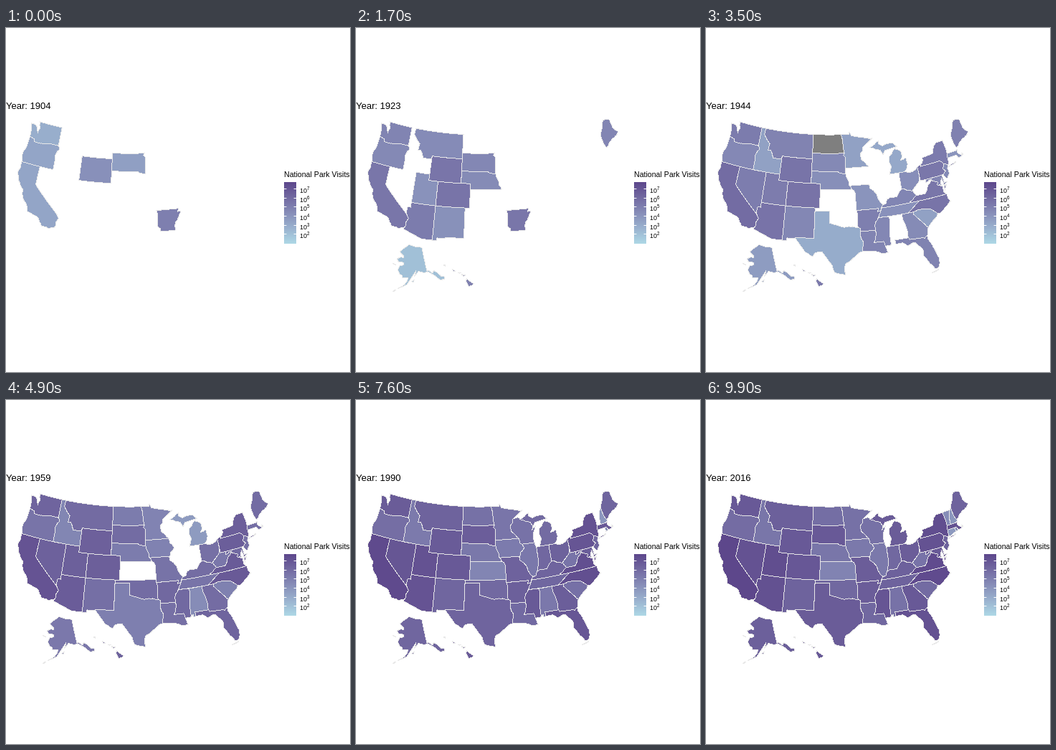
An HTML page that plays this animation: 480x480 px, repeating every 10 s.

```html
<!DOCTYPE html>
<html lang="en">
<head>
<meta charset="utf-8">
<title>Park visits by state</title>
<style>
html, body { margin: 0; width: 100%; height: 100%; overflow: hidden; background: #fff; }
svg { display: block; width: 480px; height: 480px; }
text { font-family: "Liberation Sans", Arial, sans-serif; fill: #000; }
#map path { stroke: #e8e8e8; stroke-width: 1; stroke-linejoin: round; shape-rendering: crispEdges; }
</style>
</head>
<body>
<svg viewBox="0 0 480 480">
  <g id="map"></g>
  <text id="year" x="0" y="113" font-size="13"></text>
  <g id="legend"><text x="388" y="208" font-size="10.6">National Park Visits</text></g>
</svg>
<script>
const LOOP = 10000, STEPS = 100, FIRST = 1904, LAST = 2016;
const NO_DATA = { ND: [1943, 1948] };

// Winding borders shared by two states, as key points in degrees west,north
const BORDERS = {
  'WA-OR': '124.05,46.25 122.9,46.1 122.75,45.65 121.2,45.65 119.3,45.93 118.98,46',
  'OR-ID': '116.92,46 116.5,45.5 117.2,44.4 117.03,43.8',
  'ID-MT': '111.05,44.5 113,44.45 113.9,45.65 114.5,45.6 114.35,46.65 116.05,48',
  'NV-AZ': '114.04,36.2 114.74,36.1 114.63,35',
  'CA-AZ': '114.63,35 114.14,34.3 114.53,33.5 114.5,33 114.72,32.72',
  'ND-MN': '97.23,49 96.85,47.5 96.56,45.94',
  'SD-MN': '96.56,45.94 96.85,45.6 96.45,45.3 96.45,43.5',
  'SD-NE': '96.45,42.5 97.9,42.8 98.5,43',
  'NE-IA': '96.45,42.5 95.85,41.2 95.77,40.58',
  'KS-MO': '95.3,40 94.9,39.8 94.6,39.1',
  'OK-TX': '100,34.56 97.2,33.8 95.5,33.9 94.48,33.64',
  'TX-LA': '94.04,32 93.55,31.2 93.85,29.7',
  'MN-WI': '92.1,46.75 92.3,46.1 92.85,45.6 92.75,44.75 91.2,43.5',
  'IA-WI': '91.2,43.5 91.1,42.7 90.65,42.5',
  'IA-IL': '90.65,42.5 90.2,41.8 91.1,41.2 91.4,40.4',
  'MO-IL': '91.4,40.4 91.4,39.9 90.15,38.8 89.6,37.4 89.1,37',
  'AR-MS': '90.3,35 91.1,33.9 91.17,33',
  'LA-MS': '91.17,33 91,32.4 91.6,31',
  'MS-AL': '88.1,34.95 88.45,31.9 88.4,30.3',
  'IL-IN': '87.53,39.35 88.1,37.8',
  'IL-KY': '88.1,37.8 88.5,37.1 89.1,37',
  'IN-KY': '84.8,39.1 85.4,38.7 86,38 88.1,37.8',
  'OH-KY': '84.8,39.1 83.7,38.65 82.6,38.4',
  'OH-WV': '80.52,40.64 80.85,39.7 81.7,39.1 82.6,38.4',
  'MI-WI': '87.6,45.1 88.1,45.9 90.4,46.55',
  'WV-VA': '81.97,37.54 80.3,37.5 79.2,38.7 78.35,39.4 77.83,39.13',
  'VA-MD': '77.83,39.13 77.05,38.8 77.3,38.4',
  'TN-NC': '81.68,36.59 84.32,35',
  'NC-SC': '83.1,35 82.3,35.2 81.05,35.15 79.7,34.8 78.55,33.86',
  'GA-SC': '83.1,35 83.35,34.7 81.4,32.6 80.9,32.05',
  'GA-AL': '85.6,35 85.15,32.85 85,31',
  'GA-FL': '85,31 84.86,30.7 82.2,30.57 82.05,30.36 81.45,30.7',
  'PA-NJ': '74.7,41.36 75.2,40.65 74.75,40.2 75.4,39.8',
  'PA-NY': '79.76,42 75.35,42 74.7,41.36',
  'NY-VT': '73.35,45 73.25,43.6 73.28,42.75',
  'VT-NH': '71.5,45 72.05,44.1 72.46,42.73',
  'NH-ME': '71.1,45.3 70.98,43.4 70.7,43.08'
};

// id: [year,shade keys, outlines]; ~ walks a shared border backwards
const STATES = {
  WA: ['1904,28 2016,87', '124.7,48.4 123.1,48.1 122.5,47.2 122.3,48 122.76,49 117.03,49 116.92,46 ~WA-OR 124.1,46.9'],
  OR: ['1904,34 2016,73', 'WA-OR OR-ID 117.03,42 124.2,42 124.5,42.85 124.1,44.5'],
  CA: ['1904,34 2016,100', '124.2,42 120,42 120,39 CA-AZ 117.12,32.53 118,33.65 118.5,34.03 119.2,34.15 120.6,34.5 120.65,35.15 121.9,36.3 122.5,37.8 123.7,38.9 124.35,40.3 124.1,41'],
  NV: ['1933,20 1944,73 2016,92', '120,42 114.04,42 NV-AZ 120,39'],
  ID: ['1925,28 2016,66', '117.03,49 116.05,49 ~ID-MT 111.05,42 117.03,42 ~OR-ID'],
  MT: ['1911,35 2016,82', '116.05,49 104.05,49 104.05,45 111.05,45 ID-MT'],
  WY: ['1904,48 2016,87', '111.05,45 104.05,45 104.05,41 111.05,41'],
  UT: ['1917,35 2016,95', '114.04,42 111.05,42 111.05,41 109.05,41 109.05,37 114.04,37'],
  CO: ['1909,55 2016,88', '109.05,41 102.05,41 102.05,37 109.05,37'],
  AZ: ['1915,52 2016,93', '114.04,37 109.05,37 109.05,31.33 111.07,31.33 114.81,32.5 ~CA-AZ ~NV-AZ'],
  NM: ['1916,38 2016,80', '109.05,37 103,37 103.05,32 106.6,32 106.53,31.78 108.2,31.78 108.2,31.33 109.05,31.33'],
  ND: ['1948,57 2016,72', '104.05,49 ND-MN 104.05,45.94'],
  SD: ['1904,38 1944,63 2016,87', '104.05,45.94 SD-MN SD-NE 104.05,43'],
  NE: ['1920,50 2016,66', '104.05,43 ~SD-NE NE-IA 95.3,40 102.05,40 102.05,41 104.05,41'],
  KS: ['1966,52 2016,57', '102.05,40 KS-MO 94.62,37 102.05,37'],
  OK: ['1950,72 2016,76', '103,37 94.62,37 94.43,35.4 ~OK-TX 100,36.5 103,36.5'],
  TX: ['1944,40 2016,85', '103,36.5 100,36.5 OK-TX 94.04,33.55 TX-LA 95.2,29 97.1,27.8 97.3,27 97.2,25.95 99.1,26.4 99.5,27.5 101.4,29.77 102.7,29.7 103.15,28.98 104.6,29.7 106.53,31.78 106.6,32 103.05,32'],
  MN: ['1939,42 2016,70', '97.23,49 95.15,49 95.15,49.38 94.6,48.7 92,48.3 89.6,48 MN-WI 96.45,43.5 ~SD-MN ~ND-MN'],
  IA: ['1950,55 2016,64', '96.45,43.5 91.2,43.5 IA-WI IA-IL 91.7,40.6 ~NE-IA'],
  MO: ['1943,55 2016,84', '95.77,40.58 91.7,40.6 MO-IL 89.5,36.5 89.7,36 90.37,36 90.1,36.5 94.62,36.5 ~KS-MO'],
  AR: ['1904,60 1944,70 2016,84', '94.62,36.5 90.1,36.5 90.37,36 89.7,36 AR-MS 94.04,33 94.04,33.55 94.48,33.64 94.43,35.4'],
  LA: ['1934,62 2016,76', '94.04,33 LA-MS 89.73,31 89.5,30.2 89.4,29.8 89.1,29.05 90.2,29.1 91.8,29.6 ~TX-LA'],
  MS: ['1933,52 2016,90', '90.3,35 MS-AL 89.5,30.2 89.73,31 ~LA-MS ~AR-MS'],
  AL: ['1956,48 2016,69', '88.1,34.95 GA-AL 87.6,31 87.5,30.3 88,30.25 88,30.7 ~MS-AL'],
  TN: ['1931,44 2016,80', '89.5,36.5 83.68,36.6 TN-NC 90.3,35 89.7,36'],
  KY: ['1933,59 2016,81', '~IL-KY ~IN-KY OH-KY 81.97,37.54 83.68,36.6 89.5,36.5'],
  IL: ['1972,66 2016,64', '90.65,42.5 87.8,42.5 87.53,41.7 IL-IN IL-KY ~MO-IL ~IA-IL'],
  IN: ['1967,78 2016,76', '87.53,41.7 86.8,41.76 84.8,41.75 IN-KY ~IL-IN'],
  OH: ['1934,49 2016,84', '84.8,41.72 83.45,41.72 82.7,41.45 81.7,41.5 80.52,42 OH-WV ~OH-KY'],
  MI: ['1940,42 1959,40 2016,85', '86.8,41.76 83.45,41.73 82.5,42.8 82.6,43.9 83.9,43.7 83.3,44.3 83.4,45.1 84.75,45.75 85.6,45 86.25,44.6 86.5,43.9 86.2,42.8',
    '88.2,47.45 88.3,46.9 87.4,46.5 85,46.75 84,46 87,45.75 MI-WI'],
  WI: ['1972,68 2016,70', '92.1,46.75 90.9,46.95 ~MI-WI 88,44.55 87,45.2 87.5,44.4 87.9,43.2 87.8,42.5 ~IA-WI ~MN-WI'],
  GA: ['1933,50 2016,87', 'GA-SC ~GA-FL ~GA-AL'],
  FL: ['1934,57 2016,92', '87.6,31 GA-FL 81.2,29.7 80.55,28.4 80.05,26.9 80.15,25.75 80.4,25.2 81.1,25.15 81.8,26.1 82.7,27.6 82.65,28.7 84,30.1 85.3,29.7 86.2,30.35 87.5,30.3',
    '80.4,25 81.7,24.6 81,24.7'],
  SC: ['1938,40 2016,74', 'NC-SC 79.2,33.2 ~GA-SC'],
  NC: ['1931,66 2016,97', '~TN-NC 75.87,36.55 75.5,35.25 76.5,34.65 77.95,33.87 ~NC-SC'],
  VA: ['1930,63 2016,97', '83.68,36.6 WV-VA VA-MD 76.3,37.9 76.3,37 75.87,36.55', '75.4,38 75.9,37.95 76,37.2'],
  WV: ['1955,65 2016,68', '~OH-WV 80.52,39.72 79.48,39.72 79.48,39.2 78.4,39.6 ~WV-VA'],
  MD: ['1933,56 2016,86', '79.48,39.72 75.79,39.72 75.7,38.46 75.05,38.45 75.9,37.95 76.1,39.3 76.5,38.5 76.35,38.1 ~VA-MD 78.4,39.6 79.48,39.2'],
  PA: ['1933,68 2016,92', '80.52,42 79.76,42.27 PA-NY PA-NJ 75.79,39.72 80.52,39.72'],
  NJ: ['1933,54 2016,80', '74.7,41.36 73.9,41 74.2,40.45 74.1,39.75 74.9,38.95 75.5,39.5 ~PA-NJ'],
  NY: ['1933,62 2016,95', '79.76,42.27 78.9,42.9 79.05,43.27 76.3,43.5 76.2,44.1 75,44.98 NY-VT 73.5,42.05 73.6,41.1 73.9,41 ~PA-NY', '74,40.6 73.2,40.9 72,41.05 72.6,40.8'],
  VT: ['1998,50 2016,50', 'VT-NH ~NY-VT'],
  NH: ['1967,43 2016,44', 'NH-ME 70.85,42.87 71.3,42.7 ~VT-NH'],
  ME: ['1919,52 2016,80', '71.1,45.3 70,46.7 69.23,47.45 68.3,47.36 67.8,47.07 67.8,45.7 67,44.8 69,44.1 ~NH-ME'],
  MA: ['1938,46 2016,92', '73.28,42.75 71.3,42.7 70.85,42.87 71,42.3 70.5,41.8 70,41.8 70.15,42.05 69.95,41.7 71.2,41.5 71.38,42.02 73.5,42.05'],
  CT: ['1993,40 2016,42', '73.5,42.05 71.8,42.02 71.85,41.32 73.65,41'],
  RI: ['1977,50 2016,52', '71.8,42.02 71.38,42.02 71.2,41.5 71.85,41.32'],
  AK: ['1917,0 2016,82', '141,69.65 141,60.3 139.2,60.1 137.5,58.9 135.5,59.7 134,58.8 131.8,56.6 130,55.9 130,55 133.2,55.2 136.4,57.9 140,59.75 143.9,60 148,60.9 151.8,59.2 150,61.2 153.3,59.4 156.2,57.5 158.4,56.1 164.7,54.6 160.4,56 157.6,57.7 157,58.8 162,58.6 161.9,59.6 164,59.9 166,61.6 164.8,63 161,63.6 161,64.5 166.2,64.5 168.1,65.6 164,66.5 162,66.2 162,67 166.8,68.3 163,69.7 156.6,71.3 147,70.2',
    '171.7,63.6 168.8,63.2 170,63.4', '154.5,57.3 152.3,57.9 153,57', '166.5,54 168.5,53.2 167,53.4'],
  HI: ['1916,50 2016,87', '155.9,20.25 154.8,19.5 155.7,18.95 156.05,19.7', '156.7,20.9 156,20.8 156.4,20.6', '157.3,21.1 156.75,21.17 157,21.05', '158.25,21.55 157.7,21.3 158.1,21.3', '159.75,22.1 159.4,22.2 159.4,21.9']
};

// Where the two distant states are moved, scaled and turned to
const INSETS = {
  AK: { origin: [141, 60.3], at: [99, 339], scale: .411, turn: 48 },
  HI: { origin: [155.5, 19.6], at: [158.5, 355.5], scale: 1, turn: 35 }
};

const RAD = Math.PI / 180, { sin, cos, sqrt, exp, abs, floor, round, hypot } = Math;
const $ = id => document.getElementById(id);

function add(parent, tag, attrs, text = '') {
  const el = document.createElementNS('http://www.w3.org/2000/svg', tag);
  for (const k in attrs) el.setAttribute(k, attrs[k]);
  el.textContent = text;
  return parent.appendChild(el);
}

// Lambert equal-area projection centred on 100 W, 45 N
function project([west, north]) {
  const a = (100 - west) * RAD, b = north * RAD, h = Math.SQRT1_2;
  const k = 489 * sqrt(2 / (1 + h * (sin(b) + cos(b) * cos(a))));
  return [172.7 + k * cos(b) * sin(a), 183.2 - k * h * (sin(b) - cos(b) * cos(a))];
}

function place(id, point) {
  const [x, y] = project(point), inset = INSETS[id];
  if (!inset) return [x, y];
  const { origin, at, scale, turn } = inset, [ox, oy] = project(origin);
  const dx = (x - ox) * scale, dy = (y - oy) * scale, c = cos(turn * RAD), s = sin(turn * RAD);
  return [at[0] + dx * c + dy * s, at[1] - dx * s + dy * c];
}

const parse = list => list.split(' ').map(p => p.split(',').map(Number));

function ring(spec) {
  return spec.split(' ').flatMap(token => {
    const line = BORDERS[token.replace('~', '')];
    if (!line) return parse(token);
    return token[0] === '~' ? parse(line).reverse() : parse(line);
  });
}

const noise = n => { const v = sin(n) * 43758.5453; return v - floor(v) - .5; };

// Midpoint displacement, the same in either walking direction
function roughen(p, q) {
  const length = hypot(q[0] - p[0], q[1] - p[1]);
  if (length < .3) return [p];
  const x = p[0] + q[0], y = p[1] + q[1], seed = x * 12.99 + y * 78.23;
  const mid = [x / 2 + noise(seed) * length * .16, y / 2 + noise(seed + 1) * length * .16];
  return [...roughen(p, mid), ...roughen(mid, q)];
}

// Short slanted edges are rivers or coasts; the rest follow the grid and only bend.
function edge(p, q) {
  const dx = q[0] - p[0], dy = q[1] - p[1], length = hypot(dx, dy);
  if (abs(dx) > .1 && abs(dy) > .1 && length < 2.5) return roughen(p, q);
  const n = Math.ceil(length);
  return Array.from({ length: n }, (_, i) => [p[0] + dx * i / n, p[1] + dy * i / n]);
}

function outline(id, spec) {
  const keys = ring(spec);
  const points = keys.flatMap((p, i) => edge(p, keys[(i + 1) % keys.length]));
  return 'M' + points.map(p => place(id, p).map(v => v.toFixed(2)).join(' ')).join('L') + 'Z';
}

const states = Object.entries(STATES).map(([id, [keys, ...rings]]) => ({
  id, keys: parse(keys),
  el: add($('map'), 'path', { d: rings.map(r => outline(id, r)).join('') })
}));

const shade = pct => `color-mix(in lab, #5d478b ${pct.toFixed(2)}%, #add8e6)`;

// Visits level off over the century and dip in the war years.
const growth = time => 1 - exp((FIRST - time) / 30);
const warDip = time => 10 * exp(-(((time - 1943.5) / 4) ** 2));

function levelAt(keys, time) {
  const i = keys.length > 2 && time >= keys[1][0] ? 1 : 0;
  const [[t0, a], [t1, b]] = keys.slice(i);
  const part = (growth(time) - growth(t0)) / (growth(t1) - growth(t0));
  return Math.min(100, Math.max(0, a + (b - a) * part - warDip(time)));
}

function drawLegend() {
  const g = $('legend'), top = 215, height = 86;
  for (let i = 0; i < height; i++)
    add(g, 'rect', { x: 388, y: top + i, width: 17, height: 1 }).style.fill = shade(100 * (1 - (i + .5) / height));
  for (let n = 7; n >= 2; n--) {
    const y = round(224 + (7 - n) * 12.68);
    for (const x of [388, 401.6])
      add(g, 'rect', { x, y, width: 3.4, height: 1, fill: '#fff' });
    add(g, 'text', { x: 410, y: y + 6, 'font-size': 9 }, '10');
    add(g, 'text', { x: 420, y: y + 2, 'font-size': 6.3 }, n);
  }
}

function draw(step) {
  const time = FIRST + (LAST - FIRST) * step / (STEPS - 1), year = round(time);
  $('year').textContent = 'Year: ' + year;
  for (const { id, keys, el } of states) {
    const gap = NO_DATA[id];
    const blank = gap && year >= gap[0] && year < gap[1];
    el.style.display = year >= keys[0][0] || blank ? '' : 'none';
    el.style.fill = blank ? '#7f7f7f' : shade(levelAt(keys, time));
  }
}

drawLegend();
const start = performance.now();
let shown = -1;
function tick() {
  const step = floor((performance.now() - start) % LOOP / (LOOP / STEPS));
  if (step !== shown) draw(shown = step);
  requestAnimationFrame(tick);
}
tick();
</script>
</body>
</html>
```
